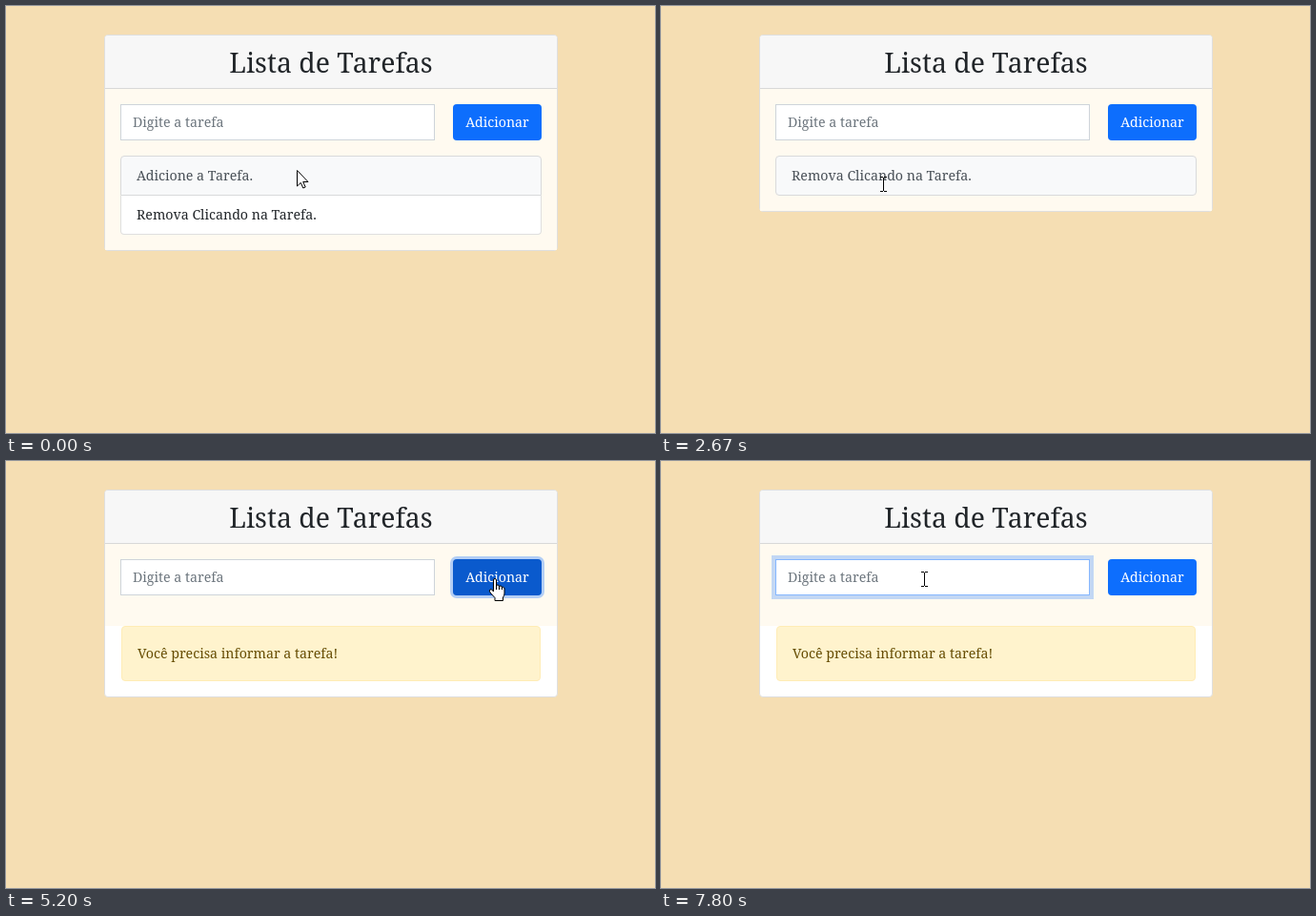
Write an HTML page that moves like this. It is 681 px wide and 448 px high and loops after 8000 ms.

```html
<!DOCTYPE html>
<html lang="pt-BR">
<head>
<meta charset="utf-8">
<title>Lista de Tarefas</title>
<style>
* { box-sizing: border-box; margin: 0; }
html, body { width: 100%; height: 100%; overflow: hidden; background: #f5deb3; }
body { position: relative; font: 14.2px/24px "Noto Serif", serif; color: #212529; white-space: nowrap; }
.card { position: absolute; left: 103px; top: 30px; width: 476px; background: #fff; border: 1px solid #dfdfdf; border-radius: 4px; }
h1 { height: 56px; padding-top: 9px; font-size: 28.4px; line-height: 38px; font-weight: 400; text-align: center; background: #f7f7f7; border-bottom: 1px solid #d8d8d8; border-radius: 3px 3px 0 0; }
.body { position: relative; padding: 70px 16px 16px; background: #fffaf0; }
.input, .button { position: absolute; top: 16px; height: 38px; padding: 7px 13px; }
.input { left: 16px; width: 330px; color: #6c757d; background: #fff; border: 1px solid; padding: 6px 12px; }
.button { left: 365px; width: 93px; padding: 7px 0; text-align: center; color: #fff; border-radius: 4px; }
.caret { position: absolute; left: 12px; top: 8px; width: 1px; height: 19px; background: #000; }
.item { height: 42px; padding: 8px 16px; background: #fff; border: 1px solid #dfdfdf; border-radius: 4px; }
.item.joined { border-radius: 4px 4px 0 0; }
.item.joined + .item { height: 41px; border-top: 0; border-radius: 0 0 4px 4px; }
.item.hover { background: #f8f9fa; color: #495057; border-color: #d9dadb; }
.item.active { background: #e9ecef; color: #212529; border-color: #cccfd1; }
.alert { height: 58px; margin: 0 17px 16px; padding: 16px; color: #664d03; background: #fff3cd; border: 1px solid #ffecb5; border-radius: 4px; }
svg { position: absolute; left: 0; top: 0; width: 1px; height: 1px; overflow: visible; }
svg path { fill: #fff; stroke: #000; }
[hidden] { display: none; }
</style>
</head>
<body>
<div class="card">
  <h1>Lista de Tarefas</h1>
  <div class="body">
    <div class="input" id="input">Digite a tarefa<i class="caret" id="caret"></i></div>
    <div class="button" id="button">Adicionar</div>
    <div class="item" id="add">Adicione a Tarefa.</div>
    <div class="item" id="remove">Remova Clicando na Tarefa.</div>
  </div>
  <div class="alert" id="alert">Você precisa informar a tarefa!</div>
</div>
<svg id="pointer">
  <path id="arrow" d="M.5 .5V17L4.3 13.4 6.8 19 9.2 18 6.7 12.5H12Z"/>
  <path id="beam" style="fill:none" d="M-3 -7.5H0M1 -7.5H4M.5 -7V7M-3 7.5H0M1 7.5H4"/>
  <g id="hand" transform="translate(-7)">
    <path d="M5.5 14V2Q5.5 .5 7 .5T8.5 2V8Q8.5 6.8 10 7T11.5 9Q11.5 7.8 13 8T14.5 10Q14.5 9 15.7 9.3T17 11V16Q17 18.5 15.5 20V23.5H7V20.5L2 15Q.5 12.8 2 11.8T5.5 14Z"/>
    <path d="M8.5 8V12M11.5 9V12M14.5 10V12"/>
  </g>
</svg>
<script>
const LOOP = 8000, FPS = 15, FADE = 150;
const DROP_ADD = 2660, DROP_REMOVE = 4130, PRESS = 5100, RELEASE = 5200, FOCUS = 7240;
const BLUE = [13, 110, 253], HOVER = [11, 94, 215], ACTIVE = [10, 88, 202];
const $ = id => document.getElementById(id);

// time, x, y of the pointer's hot spot
const path = [
  [0, 305, 172], [130, 300, 164], [470, 285, 303], [870, 312, 243], [1070, 345, 233],
  [1270, 258, 169], [1330, 245, 181], [1400, 245, 181], [1730, 262, 244], [2070, 233, 187],
  [3000, 233, 187], [3270, 255, 155], [3470, 275, 195], [3800, 284, 178], [4265, 284, 178],
  [4670, 513, 123], [5600, 513, 123], [5870, 552, 112], [6200, 420, 204], [6330, 353, 199],
  [6730, 399, 196], [7130, 276, 124], [LOOP, 276, 124]
];

const ease = p => p * p * (3 - 2 * p);
const clamp = p => Math.max(0, Math.min(1, p));
const mix = (a, b, p) => a.map((v, i) => v + (b[i] - v) * p);
const within = ([x, y], l, t, r, b) => x >= l && x < r && y >= t && y < b;

function pointerAt(t) {
  const i = path.findIndex(k => k[0] > t);
  const [a, b] = [path[i - 1], path[i]];
  return mix(a.slice(1), b.slice(1), ease((t - a[0]) / (b[0] - a[0]))).map(Math.round);
}

// Each stop starts a short transition to its value.
const fade = (t, first, ...stops) =>
  stops.reduce((v, [at, next]) => mix(v, next, ease(clamp((t - at) / FADE))), first);

const rgb = c => `rgb(${c.map(Math.round)})`;
const ring = (size, color, alpha) => `0 0 0 ${4 * size}px rgba(${color},${alpha * size})`;

function itemState(el, top, pos, pressed) {
  const over = within(pos, 120, top, 562, top + 41);
  el.classList.toggle("hover", over);
  el.classList.toggle("active", pressed);
}

function render(t) {
  const pos = pointerAt(t);
  const hasAdd = t < DROP_ADD, hasRemove = t < DROP_REMOVE, warned = t >= RELEASE - 10;

  $("add").hidden = !hasAdd;
  $("remove").hidden = !hasRemove;
  $("alert").hidden = !warned;
  $("add").classList.toggle("joined", hasAdd);
  itemState($("add"), 157, pos, t >= 2595 && hasAdd);
  itemState($("remove"), hasAdd ? 198 : 157, pos, t >= 4060 && hasRemove);

  const pressRing = fade(t, [0], [PRESS, [1]], [FOCUS, [0]])[0];
  const inputRing = fade(t, [0], [FOCUS, [1]])[0];
  $("button").style.background = rgb(fade(t, BLUE, [4540, HOVER], [PRESS, ACTIVE], [RELEASE, HOVER], [FOCUS, BLUE]));
  $("button").style.boxShadow = ring(pressRing, "49,132,253", .5);
  $("input").style.borderColor = rgb(mix([206, 212, 218], [134, 183, 254], inputRing));
  $("input").style.boxShadow = ring(inputRing, "13,110,253", .25);
  $("caret").hidden = t < FOCUS || t >= 7795;

  const onText = within(pos, 120, 103, 450, 141)
    || hasAdd && within(pos, 137, 168, 260, 189)
    || hasRemove && within(pos, 137, hasAdd ? 209 : 168, 327, hasAdd ? 230 : 189)
    || warned && within(pos, 138, 192, 353, 213);
  const onButton = within(pos, 469, 103, 562, 141);
  const shape = onButton ? "hand" : onText ? "beam" : "arrow";
  for (const id of ["arrow", "beam", "hand"]) $(id).style.display = id === shape ? "" : "none";
  $("pointer").style.transform = `translate(${pos[0]}px,${pos[1]}px)`;
}

const start = performance.now();
function tick(now) {
  const t = Math.max(0, now - start) % LOOP;
  render(Math.floor((t + 5) * FPS / 1000) * 1000 / FPS % LOOP);
  requestAnimationFrame(tick);
}
render(0);
requestAnimationFrame(tick);
</script>
</body>
</html>
```
